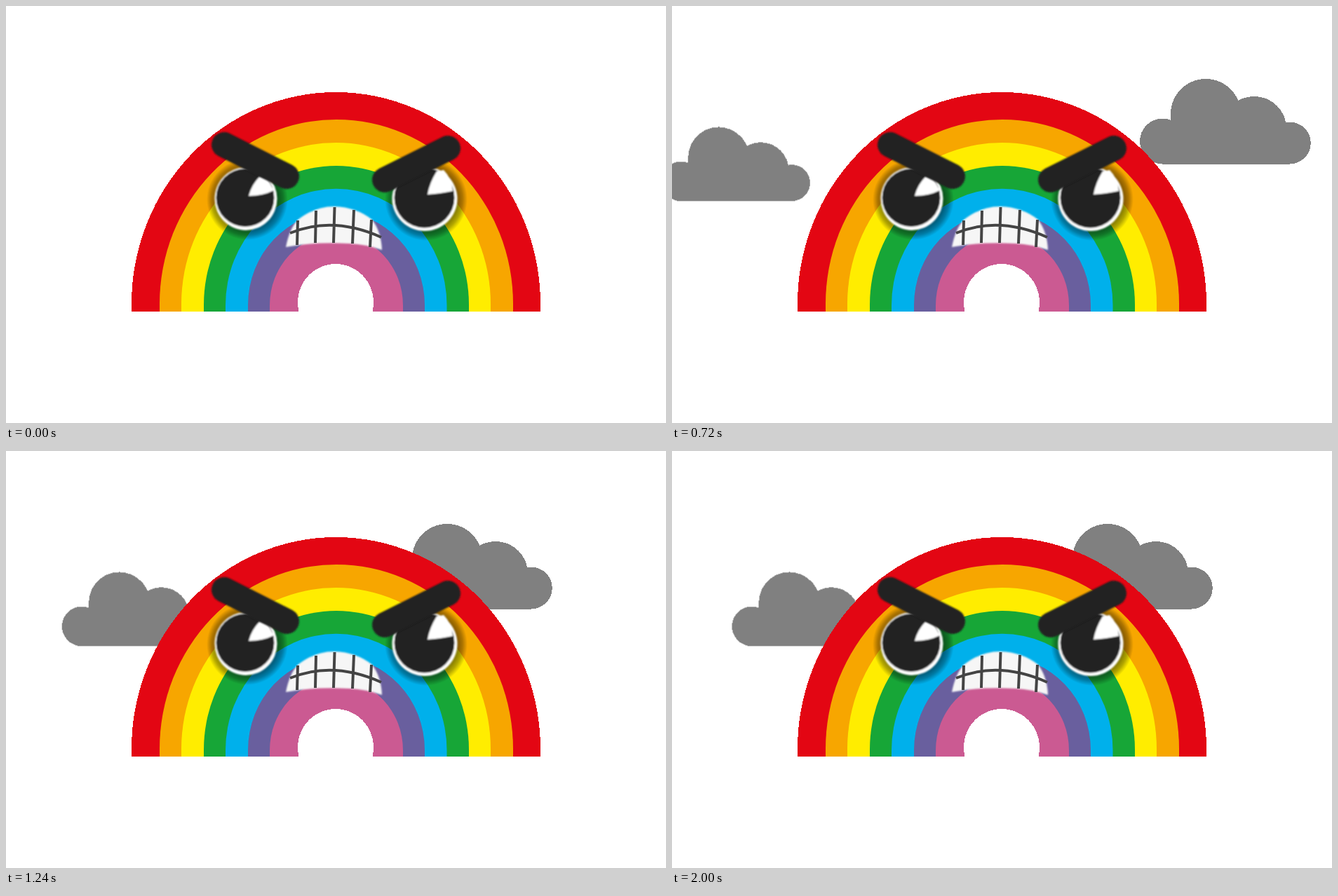
These frames come from a looping animation (941x595 px, 2.04 s). An HTML page:

```html
<!DOCTYPE html>
<html lang="en">
<head>
<meta charset="utf-8">
<title>Angry rainbow</title>
<style>
  html, body { margin: 0; width: 100%; height: 100%; overflow: hidden; background: #fff; }
  svg { display: block; width: 941px; height: 595px; }

  .drift, .bolt { animation: 2040ms linear infinite; }
  .drift { animation-name: drift; fill: #808080; }
  .drift, .crisp { shape-rendering: crispEdges; }
  .left { --side: -.72; }
  .right { --side: 1; }
  .bolt { opacity: 0; }
  .first { animation-name: first; }
  .second { animation-name: second; }

  /* Moves in steps of 40 ms; 1 step = 1.9608% */
  @keyframes drift {
    0% { transform: translateX(calc(var(--side) * 430px)); animation-timing-function: step-end; }
    7.843% { transform: translateX(calc(var(--side) * 408px)); animation-timing-function: steps(4); }
    15.686% { transform: translateX(calc(var(--side) * 356px)); animation-timing-function: steps(4); }
    23.529% { transform: translateX(calc(var(--side) * 270px)); animation-timing-function: steps(5); }
    33.333% { transform: translateX(calc(var(--side) * 159px)); animation-timing-function: steps(1); }
    35.294% { transform: translateX(calc(var(--side) * 140px)); animation-timing-function: steps(2); }
    39.216% { transform: translateX(calc(var(--side) * 107px)); animation-timing-function: steps(3); }
    45.098% { transform: translateX(calc(var(--side) * 66px)); animation-timing-function: steps(4); }
    52.941% { transform: translateX(calc(var(--side) * 30px)); animation-timing-function: steps(4); }
    60.784% { transform: translateX(calc(var(--side) * 8px)); animation-timing-function: steps(4); }
    68.627%, 100% { transform: none; }
  }
  @keyframes first {
    0%, 39.216% { opacity: 0; }
    43.137%, 47.059% { opacity: .92; }
    54.902%, 100% { opacity: 0; }
  }
  @keyframes second {
    0%, 74.51% { opacity: 0; }
    78.431%, 80.392% { opacity: .92; }
    86.8%, 100% { opacity: 0; }
  }
</style>
</head>
<body>
<svg viewBox="0 0 941 595">
  <defs>
    <g id="cloud">
      <circle cx="32.5" cy="-32.5" r="32.5"/>
      <circle cx="94" cy="-71.5" r="50"/>
      <circle cx="163" cy="-50.5" r="46"/>
      <circle cx="214" cy="-30" r="29.8"/>
      <path d="M32.5 0V-30H44V-71H144V-50H209V-30H214V0Z"/>
    </g>
    <path id="zap" d="M0 0L-55 70H-17L-22 120L26 51H-10Z"/>
    <radialGradient id="halo">
      <stop offset=".76" stop-color="#000" stop-opacity=".48"/>
      <stop offset=".88" stop-color="#000" stop-opacity=".3"/>
      <stop offset="1" stop-color="#000" stop-opacity="0"/>
    </radialGradient>
    <radialGradient id="glow">
      <stop offset=".4" stop-color="#000" stop-opacity=".12"/>
      <stop offset="1" stop-color="#000" stop-opacity="0"/>
    </radialGradient>
    <filter id="soft" filterUnits="userSpaceOnUse" x="270" y="160" width="400" height="200">
      <feGaussianBlur stdDeviation=".8"/>
    </filter>
    <clipPath id="sky"><rect y="200" width="300" height="78"/></clipPath>
  </defs>

  <g class="drift left"><use href="#cloud" transform="translate(85.5 278.500) scale(.87)"/></g>
  <g class="drift right"><use href="#cloud" transform="translate(527 225.500)"/></g>

  <g class="bolt first">
    <circle cx="110" cy="273" r="38" fill="url(#glow)" clip-path="url(#sky)"/>
    <use href="#zap" x="119" y="238" fill="#fff" stroke="#eee" stroke-width=".7"/>
  </g>

  <g id="bands">
    <path class="crisp" fill="#e30613" d="M179 436V425A291.5 302 0 0 1 762 425V436Z"/>
    <path fill="#f7a600" d="M219 436V425A252 263 0 0 1 723 425V436Z"/>
    <path fill="#ffed00" d="M250 436V425A220.5 230 0 0 1 691 425V436Z"/>
    <path fill="#17a637" d="M282 436V426A189 198 0 0 1 660 426V436Z"/>
    <path fill="#00b0eb" d="M313 436V427A157.5 166 0 0 1 628.5 427V436Z"/>
    <path fill="#695f9e" d="M345 436V427A126 133 0 0 1 597 427V436Z"/>
    <path fill="#cb5a92" d="M376 436V427A95 101 0 0 1 566 427V436Z"/>
    <path class="crisp" fill="#fff" d="M417 437L416 423A54 55 0 0 1 524 423L523 437Z"/>
  </g>

  <g id="eyes">
    <circle cx="344" cy="276" r="58" fill="url(#halo)"/>
    <circle cx="599" cy="276" r="59" fill="url(#halo)"/>
    <g filter="url(#soft)">
      <ellipse cx="342" cy="275" rx="44.5" ry="45" fill="#fff"/>
      <circle cx="341" cy="273.5" r="41.5" fill="#222"/>
      <ellipse cx="597" cy="275" rx="46.5" ry="46" fill="#fff"/>
      <circle cx="596.5" cy="273.5" r="43" fill="#222"/>
      <path fill="#fff" d="M362 243Q350 255 346 271Q366 271 382 263L372 246Z"/>
      <path fill="#fff" d="M614 236Q604 252 601 269Q618 268 637 264Q636 246 624 234Z"/>
    </g>
  </g>

  <g id="brows" filter="url(#soft)" stroke="#222" stroke-width="36" stroke-linecap="round">
    <path d="M311 198L400 243"/>
    <path d="M630 203L540 248"/>
  </g>

  <g id="mouth">
    <path filter="url(#soft)" fill="#f6f6f6" d="M399 344Q404 318 416 305Q440 286 468 286Q500 287 522 305Q535 322 536 348Q513 340 490 339Q440 336 399 344Z"/>
    <path fill="none" stroke="#444" stroke-width="4" d="M416 306L415 341M442 292L441 338M468.500 287L467 338M496 291L494 339M521 305L519 344M405 324Q466 299 535 330"/>
  </g>

  <g class="bolt second">
    <circle cx="711" cy="362" r="38" fill="url(#glow)"/>
    <use href="#zap" x="735" y="296" fill="#fff"/>
  </g>
</svg>
</body>
</html>
```
